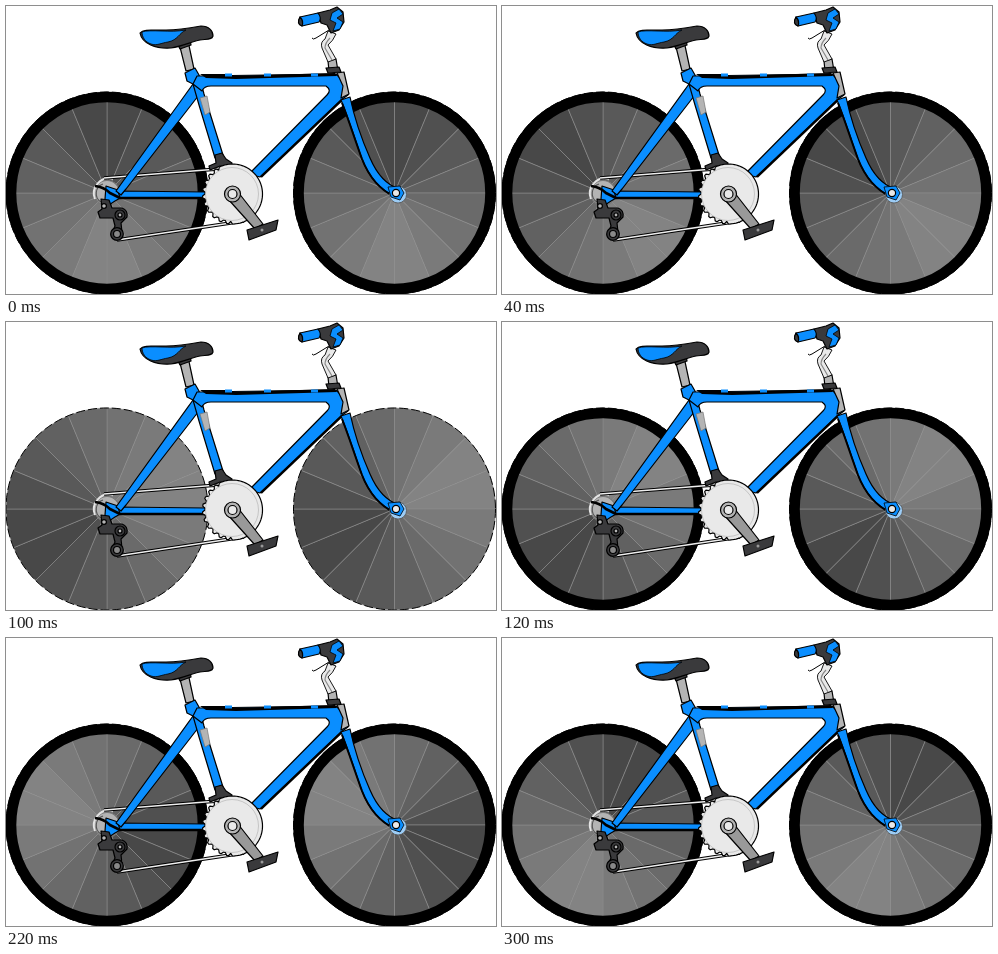
Animation of 490 by 288 pixels, one loop 0.32 s. Source, as an HTML page:

```html
<!DOCTYPE html>
<html lang="en">
<head>
<meta charset="utf-8">
<title>Bicycle</title>
<style>
html, body { margin: 0; width: 100%; height: 100%; overflow: hidden; background: #fff; }
svg { display: block; width: 490px; height: 288px; }
.blue { fill: #0a8eff; }
.dark { fill: #3a3a3c; }
.grey { fill: #b4b4b4; }
.pale { fill: #e9e9e9; }
.line { fill: none; }
#bike { stroke: #000; stroke-width: 1.2; stroke-linejoin: round; }
</style>
</head>
<body>
<svg viewBox="0 0 490 288">
  <g id="wheels"></g>
  <g id="bike">
    <!-- rear hub and cogs -->
    <circle class="grey" cx="101" cy="187" r="12.5" stroke="#777"/>
    <path class="line" d="M107 173A15 15 0 0 0 89 193" stroke="#e4e4e4" stroke-width="2"/>
    <path class="line" d="M95 196A10 10 0 0 1 97 178" stroke="#555"/>
    <path class="blue" d="M100 180L112 184L116 191L109 195L103 199L99 193Z"/>

    <!-- chain -->
    <g class="line">
      <path d="M98 172L212 163M111 234L238 215" stroke-width="3.6"/>
      <path d="M98 172L212 163M111 234L238 215" stroke="#eee" stroke-width="1.6"/>
    </g>

    <!-- rear derailleur -->
    <path class="dark" d="M95 193L103 194L106 202L116 202Q122 204 121 211L115 217L116 226L111 233L105 229L109 220L107 212L94 212L92 206L96 203Z"/>
    <circle class="grey" cx="98" cy="200" r="2.4"/>
    <circle class="dark" cx="114" cy="209" r="5"/>
    <circle class="grey" cx="114" cy="209" r="2"/>
    <circle class="dark" cx="111" cy="228" r="6.3"/>
    <circle cx="111" cy="228" r="3.5" fill="#888"/>

    <!-- stays -->
    <path class="blue" d="M112 185L200 186V192L114 192Z"/>
    <path class="blue" d="M187 78L196 85L120 183L115 189L110 185Z"/>
    <path class="line" d="M89 180Q98 181 104 187L114 192L199 192" stroke-width="2.6"/>

    <!-- seat post and tube -->
    <path class="grey" d="M173 37L182 35L188 63L180 65Z"/>
    <path d="M170 35L184 33L185 39L174 43Z" class="dark"/>
    <path class="blue" d="M179 67L189 62L193 69L198 88L217 149L209 152L193 99L187 78L181 75Z"/>
    <path class="grey" d="M194 92L201 90L204 106L199 109Z" stroke="#777" stroke-width=".7"/>

    <!-- top and down tubes -->
    <path class="blue" d="M191 70L330 68L340 78L342 89L335 94L254 171L243 168L321 89Q326 84 320 80L205 80Q198 80 196 85L187 78Z"/>
    <path d="M194 68L219 68L223 70L329 67L331 70L230 73L200 72Z" stroke="none"/>
    <path class="line" d="M219 69H226M258 69H265M305 69H312" stroke="#0a8eff" stroke-width="3"/>
    <path class="line" d="M337 93L255 171" stroke-width="2.4"/>

    <!-- fork and head -->
    <path class="blue" d="M335 94L344 91C349 115 356 134 364 152C370 166 378 178 393 183L390 191C374 184 363 171 356 153C348 130 342 111 335 94Z"/>
    <path class="line" d="M336 97C342 112 348 131 356 153C363 171 374 184 389 191" stroke-width="2"/>
    <circle cx="392" cy="188.500" r="8.500" fill="#9cccf5" stroke="#555" stroke-width=".8"/>
    <path class="blue" d="M382 181L394 180L398 187L394 194L385 191Z" stroke-width=".8"/>
    <circle class="pale" cx="390" cy="187" r="3.6"/>
    <path class="grey" d="M331 67L338 66L343 88L335 92L337 80Z"/>
    <path class="grey" d="M322 55L330 53L332 65L323 65Z"/>
    <path class="dark" d="M320 62L333 61L335 66L322 67Z"/>

    <!-- stem, bars and lever -->
    <path class="pale" d="M322 25L330 28Q327 35 322 39L330 53L322 56L316 42Q314 36 319 33Z" stroke-width=".9"/>
    <path class="line" d="M324 32Q319 37 319 42L326 54" stroke="#888"/>
    <path class="dark" d="M312 7L324 4L331 1L337 6L338 16L333 24L325 27L321 19L315 17Z"/>
    <path class="blue" d="M326 7L333 3L337 8L331 12L337 16L334 23L327 25L330 17L324 14Z" stroke-width=".8"/>
    <path class="line" d="M323 24L310 32Q307 34 306 32" stroke-width="1"/>
    <path class="blue" d="M294 11L312 7Q316 12 313 16L296 20Q291 17 294 11Z"/>
    <path class="dark" d="M294 11Q298 15 296 20Q290 18 294 11Z"/>

    <!-- saddle -->
    <path class="dark" d="M134 27C138 22 150 25 160 24C172 24 184 22 195 20C203 20 207 25 207 30C206 34 200 33 194 34C184 36 178 40 165 42C150 43 136 38 134 27Z"/>
    <path class="blue" d="M136 26C144 23 164 27 180 24C173 27 172 34 162 36C155 37 151 40 145 38C139 36 136 31 136 26Z" stroke-width=".8"/>

    <!-- front derailleur and crank set -->
    <path class="dark" d="M209 149L216 147L220 153L226 157L225 161L214 160L204 164L203 160L210 157Z"/>
    <path id="ring" class="pale"/>
    <circle class="line" cx="226" cy="188" r="26.500" stroke="#bbb" stroke-width=".8"/>
    <path d="M222 193L232 186L257 218L249 223Z" fill="#999"/>
    <circle class="grey" cx="226.500" cy="188" r="8"/>
    <circle class="pale" cx="226.500" cy="188" r="4.500"/>
    <path class="dark" d="M241 224L272 214L270 224L243 234Z"/>
    <circle cx="256" cy="224" r="1.5" fill="#999" stroke="none"/>
  </g>
</svg>
<script>
const NS = "http://www.w3.org/2000/svg";
const SECTORS = 16, STEP = 20, R = 101, BARE = 5;
const sectors = [], tyres = [];

function add(parent, tag, attrs) {
  const el = document.createElementNS(NS, tag);
  for (const k in attrs) el.setAttribute(k, attrs[k]);
  parent.appendChild(el);
  return el;
}

function polar(cx, cy, r, turn) {
  const a = turn * 2 * Math.PI;
  return (cx + r * Math.sin(a)).toFixed(2) + " " + (cy - r * Math.cos(a)).toFixed(2);
}

function addWheel(cx, cy) {
  const g = add(document.getElementById("wheels"), "g", {});
  for (let i = 0; i < SECTORS; i++) {
    const p = polar(cx, cy, R, i / SECTORS), q = polar(cx, cy, R, (i + 1) / SECTORS);
    const el = add(g, "path", {
      d: `M${cx} ${cy}L${p}A${R} ${R} 0 0 1 ${q}Z`,
      stroke: "#8c8c8c", "stroke-width": 0.6
    });
    sectors.push({ el, i });
  }
  add(g, "circle", { cx, cy, r: R, fill: "none", stroke: "#000", "stroke-dasharray": "9 3" });
  tyres.push(add(g, "circle", { cx, cy, r: 96, fill: "none", stroke: "#000", "stroke-width": 10.6 }));
}

// Chainring: teeth show on the left and lower edge only
function ringPath() {
  const pts = [];
  for (let i = 0; i < 96; i++) {
    const turn = i / 96;
    const tooth = turn > 0.5 && turn < 0.92 && i % 4 < 2;
    pts.push(polar(226.5, 188, tooth ? 27.5 : 30, turn));
  }
  return "M" + pts.join("L") + "Z";
}

function draw(ms) {
  const step = Math.floor(ms / STEP) % SECTORS;
  for (const { el, i } of sectors) {
    const k = (i + step) % SECTORS;
    const v = Math.round(72 + 8.4 * Math.min(k, SECTORS - 1 - k));
    el.setAttribute("fill", `rgb(${v},${v},${v})`);
  }
  for (const t of tyres) t.setAttribute("visibility", step === BARE ? "hidden" : "visible");
}

addWheel(101, 187);
addWheel(388.5, 187);
document.getElementById("ring").setAttribute("d", ringPath());

const start = performance.now();
function tick() {
  draw(performance.now() - start);
  requestAnimationFrame(tick);
}
draw(0);
requestAnimationFrame(tick);
</script>
</body>
</html>
```
